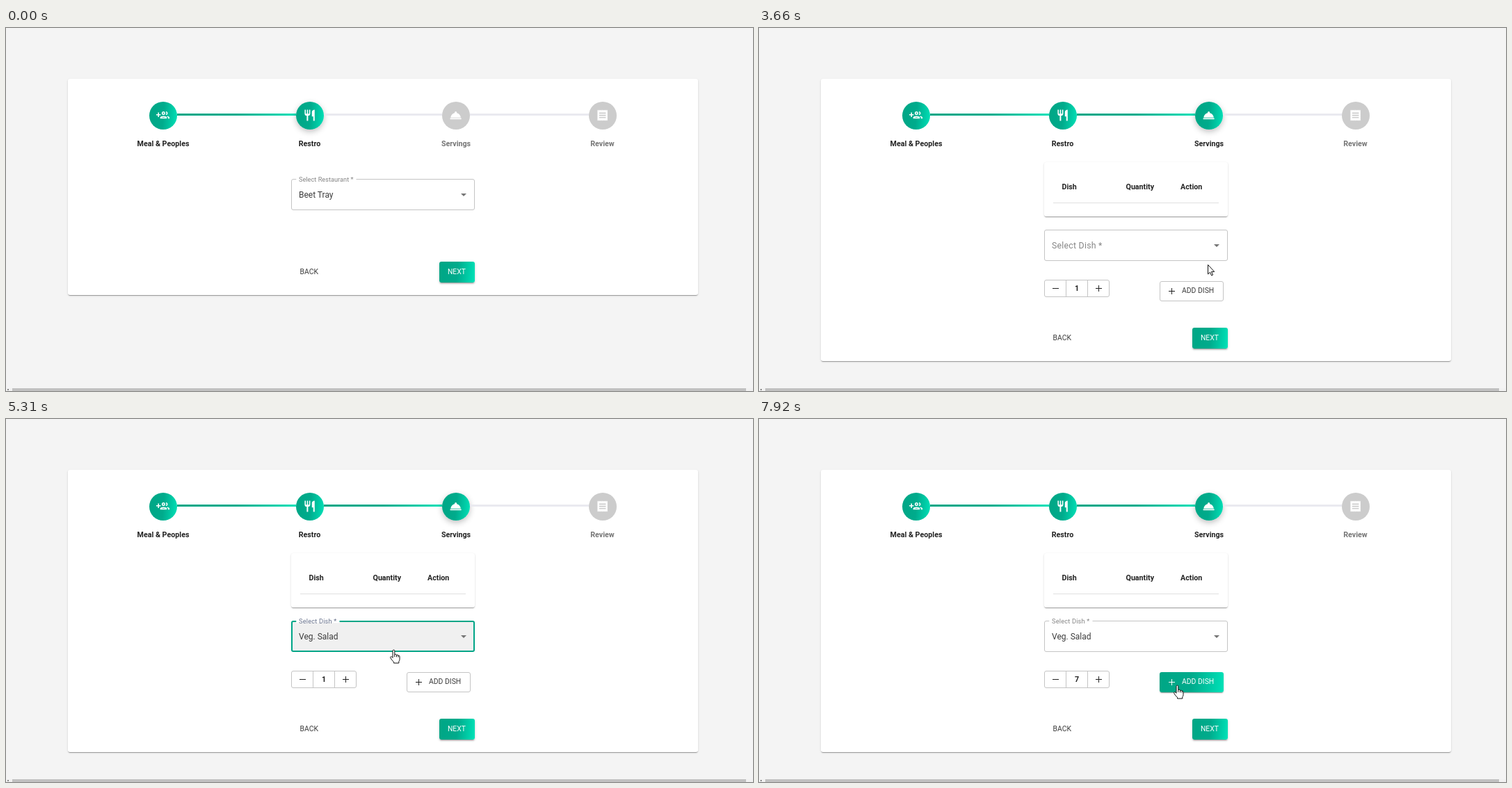
These frames come from a looping animation (1074 px wide and 522 px high, 8 s). An HTML page:

```html
<!DOCTYPE html>
<html lang="en">
<head>
<meta charset="utf-8">
<title>Meal order stepper</title>
<style>
  :root {
    --grad: linear-gradient(95deg, #00a685 0%, #00ab8c 50%, #00e2b8 100%);
    --teal: #00a587;
    --line: #c4c4c4;
    --low: 0 2px 1px -1px rgba(0,0,0,.2), 0 1px 1px rgba(0,0,0,.14), 0 1px 3px rgba(0,0,0,.12);
  }
  html, body { margin: 0; width: 100%; height: 100%; overflow: hidden; }
  body { position: relative; background: #f4f4f4; font: 12px/20px Roboto, sans-serif; color: #3c3c3c; }
  div, span, svg { position: absolute; box-sizing: border-box; }
  span { white-space: nowrap; height: 20px; margin-top: -10px; }
  .mid { transform: translateX(-50%); }
  .bold { font-size: 10.7px; font-weight: 600; color: #222; }
  .btn { font-size: 10.4px; }
  .paper { background: #fff; border-radius: 3px; box-shadow: var(--low); }
  #card { left: 89px; top: 73px; width: 906px; height: 311px; }

  .dot { width: 40px; height: 40px; top: 105.5px; border-radius: 50%; background: #ccc; }
  .dot svg { left: 10.4px; top: 10.4px; width: 19.2px; height: 19.2px; fill: #fff; overflow: visible; }
  .dot.done { background: var(--grad); }
  .dot.now { box-shadow: 0 3px 8px rgba(0,0,0,.25); }
  .link { top: 123px; height: 2.6px; width: 170.5px; background: #eaeaf0; }
  .link.done { background: var(--grad); }
  .step { top: 166.5px; color: #757575; }
  .step.done { color: #222; }

  .select { left: 410px; width: 264px; height: 45px; border: 1px solid var(--line); border-radius: 3px; }
  .select.over { border-color: #212121; }
  .select.focus { border: 2px solid var(--teal); background: #f0f0f0; }
  .arrow { left: 654px; width: 0; height: 0; border: 4.2px solid transparent; border-top-color: #757575; border-bottom: 0; }
  .label { left: 416px; padding: 0 5px; font-size: 12.3px; color: #858585; transform-origin: 5px 50%; }
  .label.up { background: linear-gradient(#fff, #fff) 0 50% / 100% 5px no-repeat; }
  #dishLabel { letter-spacing: .25px; }

  #next { left: 622.5px; top: 336px; width: 51px; height: 30px; border-radius: 3px; background: var(--grad); overflow: hidden; }
  #nextShadow { left: 622.5px; top: 336px; width: 51px; height: 30px; border-radius: 3px;
    box-shadow: 0 2px 1px -1px rgba(0,0,0,.2), 0 2px 2px rgba(0,0,0,.14), 0 1px 4px rgba(0,0,0,.12); }
  #nextShadow.over { box-shadow: 0 2px 3px -1px rgba(0,0,0,.2), 0 3px 4px rgba(0,0,0,.14), 0 1px 8px rgba(0,0,0,.12); }
  #nextShadow.down { box-shadow: 0 4px 4px -2px rgba(0,0,0,.2), 0 6px 8px rgba(0,0,0,.14), 0 2px 11px rgba(0,0,0,.14); }
  #ripple { left: -6px; top: -25px; width: 80px; height: 80px; border-radius: 50%; background: #fff; }

  #count { left: 410px; top: 362px; width: 94px; height: 25px; border: 1px solid var(--line); border-radius: 3px; }
  #plus { left: 62px; top: 0; width: 30px; height: 23px; }
  #plus.over { background: #f5f5f5; }
  .rule { top: 0; width: 1px; height: 23px; background: var(--line); }
  .ink { background: #222; }
  #add { left: 576px; top: 363.5px; width: 92px; height: 29px; border: 1px solid var(--line); border-radius: 3px; color: #3c3c3c; }
  #add .ink { background: #222; }
  #add.over { border: 0; padding: 1px; color: #fff; background: var(--grad); box-shadow: var(--low); }
  #add.over .ink { background: #fff; }
  #add.over > * { margin-left: 1px; }
  #add.over > div { margin-top: 1px; }
  #add.over > span { margin-top: -9px; }

  #menu { left: 410px; top: 292px; width: 264px; height: 185px; border-radius: 3px; background: #fff; transform-origin: 50% 20px;
    box-shadow: 0 4px 4px -2px rgba(0,0,0,.2), 0 6px 8px 1px rgba(0,0,0,.14), 0 2px 11px 2px rgba(0,0,0,.12); }
  .row { left: 0; width: 264px; height: 28.8px; }
  .row.over { background: #f5f5f5; }
  .row span { left: 13px; top: 14.8px; }

  #bar { left: 0; bottom: 0; width: 100%; height: 4px; background: #f1f1f1; }
  #thumb { left: 9px; top: 0; width: 1055px; height: 4px; background: #c1c1c1; }
  #thumb.over { background: #a8a8a8; }
  #cursor { left: 0; top: 0; width: 1px; height: 1px; overflow: visible; fill: #fff; stroke: #111; stroke-linejoin: round; }
</style>
</head>
<body>
<div id="card" class="paper"></div>
<div id="steps"></div>

<div id="restro">
  <div class="select" style="top:217px"></div>
  <span class="label up" style="top:218px;transform:scale(.75)">Select Restaurant *</span>
  <span style="left:421px;top:240px">Beet Tray</span>
  <div class="arrow" style="top:238px"></div>
</div>

<div id="servings">
  <div class="paper" style="left:410px;top:193px;width:264px;height:78px"></div>
  <span class="bold" style="left:435.5px;top:229px">Dish</span>
  <span class="bold" style="left:527.5px;top:229px">Quantity</span>
  <span class="bold" style="left:606px;top:229px">Action</span>
  <div style="left:423px;top:251px;width:238px;height:1px;background:#e0e0e0"></div>
  <div id="dish" class="select" style="top:290px"></div>
  <span id="dishLabel" class="label" style="top:313px">Select Dish *</span>
  <span id="dishValue" style="left:421px;top:313px">Veg. Salad</span>
  <div class="arrow" style="top:311px"></div>
  <div id="count">
    <div id="plus"></div>
    <div class="rule" style="left:30px"></div>
    <div class="rule" style="left:61px"></div>
    <div class="ink" style="left:11px;top:11px;width:9px;height:1.4px"></div>
    <div class="ink" style="left:73px;top:11px;width:9px;height:1.4px"></div>
    <div class="ink" style="left:76.8px;top:7.2px;width:1.4px;height:9px"></div>
    <span id="qty" class="bold mid" style="left:46px;top:11.5px">1</span>
  </div>
  <div id="add">
    <div class="ink" style="left:12px;top:13px;width:9px;height:1.5px"></div>
    <div class="ink" style="left:15.8px;top:9.2px;width:1.5px;height:9px"></div>
    <span class="btn" style="left:31px;top:13.8px">ADD DISH</span>
  </div>
</div>

<div id="actions" style="left:0;top:0">
  <span class="btn" style="left:422.5px;top:350.5px">BACK</span>
  <div id="nextShadow"></div>
  <div id="next">
    <span class="btn" style="left:12.4px;top:14.7px;color:#fff">NEXT</span>
    <div id="ripple"></div>
  </div>
</div>

<div id="menu"></div>
<div id="bar">
  <div id="thumb"></div>
  <div style="left:2px;top:1px;width:2px;height:2px;background:#888"></div>
</div>

<svg id="cursor">
  <path id="pointer" d="M0 0V13.4L3 10.7 5.1 15.4 7.1 14.5 5 9.9H9.2Z"/>
  <g id="hand">
    <path d="M-1.5 10.5V1a1.4 1.4 0 0 1 2.8 0V6q2.2-.8 2.7.8 2-.6 2.5.8 2-.3 2 1.6V13q0 2-1.2 3.2V18.5H0V16.8q-2.5-2-4.6-5.6-.9-1.6.6-2 1.2-.2 2.5 1.6z"/>
    <path fill="none" d="M1.3 6V9.5M4 6.8V9.8M6.5 7.6V10"/>
  </g>
</svg>

<script>
const LOOP = 8000;
const $ = id => document.getElementById(id);
const clamp = v => Math.min(1, Math.max(0, v));
const ramp = (t, start, length) => clamp((t - start) / length);
const smooth = v => v * v * (3 - 2 * v);
const toggle = (el, name, on) => el.classList.toggle(name, on);
const show = (el, on) => { el.style.display = on ? '' : 'none'; };

const OPEN = 3940, PICK = 5080, PRESS = 1910, RELEASE = 2310, FIRST_PLUS = 6610;

const steps = [
  ['Meal & Peoples', `<path d="M8 10H5V7H3v3H0v2h3v3h2v-3h3z"/>
    <g fill="none" stroke="#fff" stroke-width="1.9"><circle cx="13" cy="8" r="2.2"/>
    <path d="M8 17v-1c0-1 3-2 5-2s5 1 5 2v1zM17.4 5.8a2.2 2.2 0 0 1 0 4.4M19.5 14q3.5 1 3.5 2v1h-2"/></g>`],
  ['Restro', '<path d="M11 9H9V2H7v7H5V2H3v7c0 2.12 1.66 3.84 3.75 3.97V22h2.5v-9.03C11.34 12.84 13 11.12 13 9V2h-2v7zm5-3v8h2.5v8H21V2c-2.76 0-5 2.24-5 4z"/>'],
  ['Servings', '<path d="M2 17h20v2H2zm11.84-9.21c.1-.24.16-.51.16-.79 0-1.1-.9-2-2-2s-2 .9-2 2c0 .28.06.55.16.79C6.25 8.6 3.27 11.93 3 16h18c-.27-4.07-3.25-7.4-7.16-8.21z"/>'],
  ['Review', '<path d="M18 17H6v-2h12zm0-4H6v-2h12zm0-4H6V7h12zM3 22l1.5-1.5L6 22l1.5-1.5L9 22l1.5-1.5L12 22l1.5-1.5L15 22l1.5-1.5L18 22l1.5-1.5L21 22V2l-1.5 1.5L18 2l-1.5 1.5L15 2l-1.5 1.5L12 2l-1.5 1.5L9 2 7.5 3.5 6 2 4.5 3.5 3 2z"/>'],
];
$('steps').innerHTML = steps.map(([name, icon], i) => {
  const x = 226 + 210.5 * i;
  const link = i ? `<div class="link" style="left:${x - 190.5}px"></div>` : '';
  return `${link}<div class="dot" style="left:${x - 20}px"><svg viewBox="0 0 24 24">${icon}</svg></div>
    <span class="bold step mid" style="left:${x}px">${name.replace('&', '&amp;')}</span>`;
}).join('');
const dots = document.querySelectorAll('.dot');
const links = document.querySelectorAll('.link');
const names = document.querySelectorAll('.step');

const dishes = ['Vegan Bento', 'Veg. Salad', 'Fruit Salad', 'Corn Soup', 'Tomato Soup', 'Minestrone Soup'];
$('menu').innerHTML = dishes.map((d, i) =>
  `<div class="row" style="top:${6.4 + 28.8 * i}px"><span>${d}</span></div>`).join('');
const rows = document.querySelectorAll('.row');

// Pointer moves: start, end, number of ticks, then [tick, x, y] waypoints.
const moves = [
  [590, 800, 4, [[1, 1065, 507], [2, 968, 452], [3, 882, 402], [4, 821, 376]]],
  [1080, 1710, 10, [[0, 821, 376], [4, 719, 364], [8, 666, 353], [10, 657, 351]]],
  [3660, 3800, 3, [[0, 657, 351], [1, 645, 340], [3, 618, 320]]],
  [3940, 4700, 12, [[0, 618, 320], [4, 612, 318], [10, 566, 322], [12, 563, 326]]],
  [4770, 5520, 11, [[0, 563, 326], [3, 557, 332]]],
  [5650, 6410, 12, [[0, 557, 332], [10, 506, 378], [12, 490, 379]]],
  [7430, 7920, 8, [[0, 490, 379], [8, 601, 383]]],
];

function pointerAt(t) {
  const move = moves.filter(m => m[0] <= t).pop();
  if (!move) return null;
  const [start, end, count, path] = move;
  const tick = Math.min(count, 1 + Math.floor((t - start) / (end - start) * (count - 1) + .1));
  const j = path.findIndex(p => p[0] >= tick);
  if (j < 0) return path[path.length - 1].slice(1);
  if (!j) return path[0].slice(1);
  const [k0, x0, y0] = path[j - 1], [k1, x1, y1] = path[j];
  const u = (tick - k0) / (k1 - k0);
  return [x0 + (x1 - x0) * u, y0 + (y1 - y0) * u];
}

function drawSteps(current) {
  dots.forEach((d, i) => {
    toggle(d, 'done', i <= current);
    toggle(d, 'now', i === current);
    toggle(names[i], 'done', i <= current);
  });
  links.forEach((l, i) => toggle(l, 'done', i < current));
}

function render(t) {
  const serving = t >= RELEASE;
  const open = t >= OPEN && t < PICK + 200;
  const focus = t >= OPEN && t < FIRST_PLUS;
  const pos = pointerAt(t);
  const inside = (x0, y0, x1, y1) => !!pos && pos[0] >= x0 && pos[0] <= x1 && pos[1] >= y0 && pos[1] <= y1;

  drawSteps(serving ? 2 : 1);
  show($('restro'), !serving);
  show($('servings'), serving);
  $('card').style.height = (serving ? 406 : 311) + 'px';
  $('actions').style.top = (serving ? 95 : 0) + 'px';

  const overNext = !serving && inside(622, 336, 674, 366);
  const overSelect = serving && inside(410, 290, 674, 335);
  const overPlus = serving && !open && inside(472, 362, 504, 387);
  const overAdd = serving && !open && inside(576, 364, 668, 392);

  toggle($('nextShadow'), 'over', overNext);
  toggle($('nextShadow'), 'down', t >= PRESS && t < 2450);
  $('ripple').style.opacity = t < PRESS ? 0 : .3 * (1 - smooth(ramp(t, RELEASE, 500)));
  $('ripple').style.transform = `scale(${1.3 * smooth(ramp(t, PRESS, 500))})`;

  toggle($('dish'), 'over', overSelect && !focus);
  toggle($('dish'), 'focus', focus);
  const lift = smooth(ramp(t, OPEN, 200));
  $('dishLabel').style.transform = `translateY(${-22 * lift}px) scale(${1 - .25 * lift})`;
  $('dishLabel').style.color = focus ? '#66708a' : '';
  toggle($('dishLabel'), 'up', lift > .5);
  show($('dishValue'), t >= PICK);

  show($('menu'), open);
  const grow = smooth(ramp(t, OPEN, 250));
  $('menu').style.opacity = grow * (1 - ramp(t, PICK, 200));
  $('menu').style.transform = `scale(${.75 + .25 * grow}, ${.56 + .44 * grow})`;
  const hovered = pos ? Math.max(0, Math.floor((pos[1] - 298.4) / 28.8)) : -1;
  rows.forEach((r, i) => toggle(r, 'over', i === hovered));

  toggle($('plus'), 'over', overPlus);
  toggle($('add'), 'over', overAdd);
  $('qty').textContent = t < FIRST_PLUS ? 1 : Math.min(7, 2 + Math.floor((t - FIRST_PLUS) / 140));

  show($('bar'), !open);
  toggle($('thumb'), 'over', t >= 590 && t < 660);

  show($('cursor'), !!pos);
  if (pos) {
    const hand = overNext || overSelect || overPlus || overAdd || open;
    show($('hand'), hand);
    show($('pointer'), !hand);
    $('cursor').style.transform = `translate(${Math.round(pos[0]) + .5}px, ${Math.round(pos[1]) + .5}px)`;
  }
}

const begin = performance.now();
function loop() {
  render((performance.now() - begin) % LOOP);
  requestAnimationFrame(loop);
}
loop();
</script>
</body>
</html>
```
